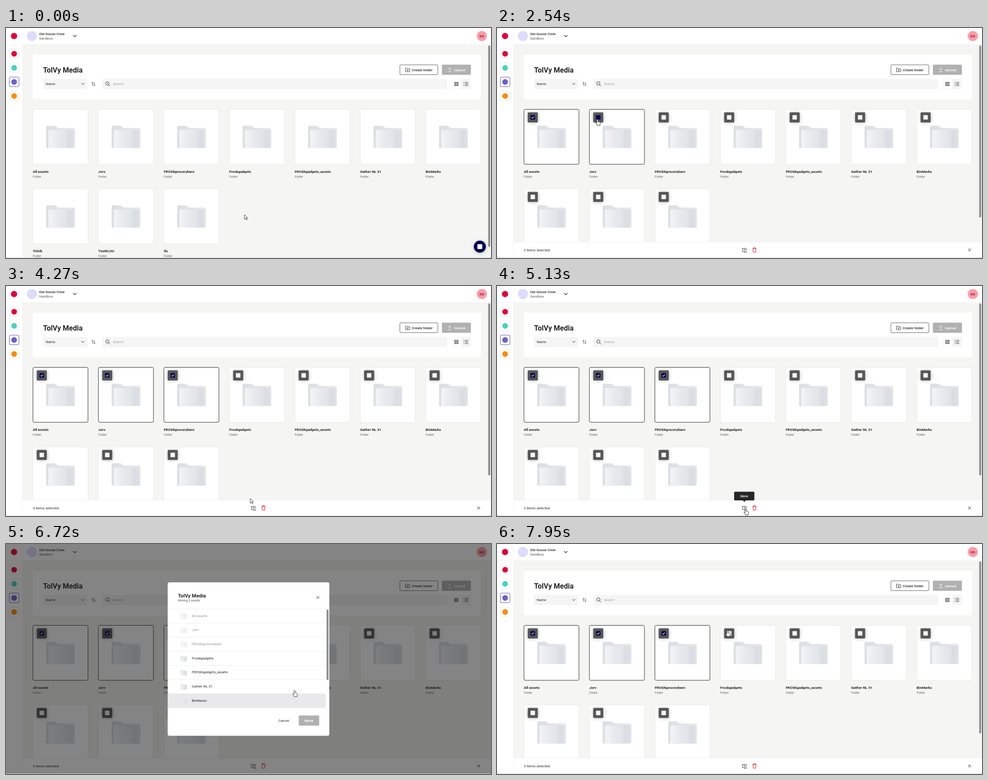
These frames come from a looping animation (1086 px wide and 516 px high, 8 s). An HTML page:

```html
<!DOCTYPE html>
<html lang="en">
<head>
<meta charset="utf-8">
<title>Media library</title>
<style>
html, body { margin: 0; width: 100%; height: 100%; overflow: hidden; background: #f5f5f4; }
svg { display: block; width: 1086px; height: 516px; font-family: Roboto, sans-serif; }
</style>
</head>
<body>
<svg id="stage" viewBox="0 0 1086 516" xmlns="http://www.w3.org/2000/svg"></svg>
<script>
const LOOP = 8000;
const INK = '#252525', NAVY = '#00004f', GREY = '#b1b1b1';
const NAMES = ['All assets', 'Jorv', 'FROSKgrocerybarn', 'Froskgadgets', 'FROSKgadgets_assets',
  'Gather NL 31', 'BinMarks', 'Tolvik', 'TestKLOU', 'Ila'];
const TITLE = 'TolVy Media';
const CLICKS = [1600, 2480, 3260];
const OPEN = 5450, LOADED = 5720, CLOSE = 7720;
const ROW = 31.7, LIST_TOP = 145.6, LIST_END = 367.5;

// pointer stops: time, x, y
const PATH = [
  [0, 534, 419], [180, 534, 419], [950, 28, 118], [1000, 28, 118], [1400, 79, 199],
  [1650, 79, 199], [2360, 225, 205], [2620, 225, 205], [3180, 372, 200], [3400, 372, 200],
  [4200, 547, 477], [4300, 547, 477], [4800, 557, 500], [6000, 557, 500], [6500, 630, 370],
  [6720, 646, 329], [6770, 648, 322], [6810, 649, 318], [7500, 702, 117], [7720, 702, 117],
  [7950, 516, 194], [8000, 516, 194]
];

const cardPos = i => ({ x: 60 + (i % 7) * 146.6, y: 182.3 + (i > 6 ? 178.4 : 0) });
const rowY = i => LIST_TOP + i * ROW;

const rect = (x, y, w, h, fill, r = 0, extra = '') =>
  `<rect x="${x}" y="${y}" width="${w}" height="${h}" rx="${r}" fill="${fill}" ${extra}/>`;
const circle = (x, y, r, fill, extra = '') => `<circle cx="${x}" cy="${y}" r="${r}" fill="${fill}" ${extra}/>`;
// y is the middle of the line
const text = (x, y, s, size = 8, weight = 400, fill = INK, extra = '') =>
  `<text x="${x}" y="${y + size * 0.355}" font-size="${size}" font-weight="${weight}" fill="${fill}" ${extra}>${s}</text>`;
const line = (d, stroke = INK, w = 1, extra = '') =>
  `<path d="${d}" fill="none" stroke="${stroke}" stroke-width="${w}" ${extra}/>`;
const group = (id, body, extra = '') => `<g id="${id}" ${extra}>${body}</g>`;
const MID = 'text-anchor="middle"';

const defs = `<defs>
  <linearGradient id="front"><stop offset="0" stop-color="#f3f4f6"/><stop offset=".3" stop-color="#e9ebee"/>
    <stop offset=".62" stop-color="#e2e5e9"/><stop offset=".8" stop-color="#d9dde1"/><stop offset="1" stop-color="#dfe2e6"/></linearGradient>
  <linearGradient id="back"><stop offset="0" stop-color="#dcdfe2"/><stop offset="1" stop-color="#e6e8eb"/></linearGradient>
  <filter id="soft" x="-60%" y="-60%" width="220%" height="220%"><feGaussianBlur stdDeviation="4"/></filter>
  <g id="folder">
    <path d="M30 40Q30 37 33 37H48Q51 37 53 39.5T58 42H91Q94 42 94 45V84Q94 87 91 87H33Q30 87 30 84Z" fill="url(#back)"/>
    <path d="M35 49Q35 46.500 37.500 46.500H92Q94 46.500 94 48.500V84Q94 87 91 87H38Q35 87 35 84Z" fill="url(#front)"/>
  </g></defs>`;

function header() {
  let s = rect(0, 0, 1086, 37, '#fff') + rect(0, 37, 37, 479, '#fff') +
    line('M0 37H1086M37 0V516', '#f0f0f0', 0.8) +
    circle(18, 18, 7, '#e4003a') + circle(58, 18, 11.3, '#dcdcfb') +
    text(74, 12.8, 'Old Goose Crew', 8, 500) + text(74, 23, 'Sandbox', 8, 400, '#555') +
    line('M150.300 16L154 19.700 157.700 16', INK, 1.2) +
    circle(1065.5, 18, 11.3, '#ff9ba8') + text(1065.5, 18.2, 'KD', 8, 500, '#6b1424', MID);
  ['#e4003a', '#45d3bb', '#6b60c9', '#ff8a00'].forEach((c, i) => {
    const y = 47 + i * 31.6;
    s += rect(7.5, y, 21.5, 21.5, '#fff', 2.5, `stroke="${i === 2 ? '#5450bd' : '#ececec'}"`) +
      circle(18.2, y + 10.8, 6.3, c);
  });
  return s;
}

function panel() {
  return rect(60, 60, 1003.5, 99.5, '#fff', 3) + text(83, 94, TITLE, 16, 700) +
    rect(882, 82.7, 85, 22, '#fff', 2, 'stroke="#5c5c5c"') +
    line('M894.500 97.500V90H898L899.500 91.500H904V98H894.500ZM899.300 92.800V96.600M897.400 94.700H901.200', INK, 0.9) +
    text(908.5, 94, 'Create folder', 8, 500) +
    rect(976, 82.3, 65, 22.8, GREY, 2) +
    line('M993.500 95.500V90M991 92.200L993.500 89.700 996 92.200M989.500 98H997.500', '#fff', 1) +
    text(1003, 94, 'Upload', 8, 500, '#fff') +
    rect(83, 114, 99, 23, '#f5f5f5', 2) + text(89, 125.3, 'Name') +
    line('M168.500 123.500L172 127 175.500 123.500') +
    line('M193.800 129.500V121.500M191.800 123.700L193.800 121.500 195.800 123.700M198 121.500V129.500M196 127.300L198 129.500 200 127.300', '#444', 0.9) +
    rect(216, 114, 772, 23, '#f5f5f5', 2) +
    `<circle cx="227" cy="124.500" r="3.700" fill="none" stroke="${INK}"/>` + line('M229.700 127.300L233 130.700') +
    text(239.5, 125.5, 'Search', 8, 400, '#a0a0a0', 'font-style="italic"') +
    rect(998, 114, 43, 23, '#f5f5f5', 2) + rect(999, 115, 20, 21, '#fff', 2) +
    line('M1004.500 121.500h3v3h-3zM1009.500 121.500h3v3h-3zM1004.500 126.500h3v3h-3zM1009.500 126.500h3v3h-3z') +
    line('M1024.500 122h1.500M1027.500 122h7.500M1024.500 125.500h1.500M1027.500 125.500h7.500M1024.500 129h1.500M1027.500 129h7.500', INK, 1.1);
}

const card = (name, i) => {
  const { x, y } = cardPos(i);
  return `<g transform="translate(${x} ${y})">` +
    rect(0.3, 0.2, 123.3, 123.3, '#fff', 3, `id="frame${i}" stroke="#e8e8e8"`) +
    '<use href="#folder"/>' +
    group('tile' + i, rect(9, 8, 23, 22, '#000', 2, 'opacity=".25" filter="url(#soft)"') +
      rect(8.8, 7, 22.6, 22.6, '#575757', 2) +
      rect(15.1, 13.2, 10, 10, '#f6f6f6', 1, `id="box${i}"`) +
      line('M17.400 18.300L19.300 20.300 22.900 16.300', '#fff', 1.2, `id="tick${i}"`)) +
    text(0, 139.7, name, 8, 700) + text(0, 150.8, 'Folder', 6.8, 400, '#666') + '</g>';
};

function bottomBar() {
  return rect(37.4, 480, 1049, 36, '#fff') + line('M37 480H1086', '#ededed', 0.8) +
    text(60, 498, '', 8, 400, INK, 'id="count"') +
    line('M549.500 493V501.500H553.500M549.500 495.500H553.500M553.500 494H555.500L556.300 495H558.800V497.500H553.500ZM553.500 500H555.500L556.300 501H558.800V503.500H553.500Z', '#444', 0.9) +
    line('M572.200 494.500H580.800M574.800 494.300V493H578.200V494.300M573.200 495L573.800 503H579.200L579.800 495', '#d5202c', 1.1) +
    line('M1055.200 495L1061.200 501M1061.200 495L1055.200 501', INK, 1);
}

function dialog() {
  let bones = '', rows = '';
  for (let i = 0; i < 5; i++) {
    const y = rowY(i);
    bones += rect(385, y + 2.6, 25.6, 26, '#e9e9eb', 4) + rect(416.3, y + 11.2, 104, 9, '#e9e9eb', 2) +
      line(`M362 ${y}H724`, '#ededed', 0.9);
  }
  for (let i = 0; i < 7; i++) {
    const y = rowY(i);
    rows += rect(362, y, 354, ROW, '#e9e9eb', 0, `id="row${i}"`) +
      `<g opacity="${i < 3 ? 0.5 : 1}"><use href="#folder" transform="translate(384.400 ${y + 0.8}) scale(.22 .25)"/>` +
      text(416, y + 15.2, NAMES[i], 8) + '</g>' + line(`M362 ${y}H724`, '#ededed', 0.9);
  }
  rows += line(`M362 ${LIST_END}H724`, '#ededed', 0.9);
  return rect(362, 86, 362, 344.3, '#fff', 4) +
    text(385, 116.3, TITLE, 11.3, 700) + text(385, 126.7, 'Moving 3 assets', 6.75, 400, '#555') +
    line('M695.500 117L701.500 123M701.500 117L695.500 123', INK, 1) +
    group('bones', bones) + group('rows', rows) +
    group('listBar', rect(716, 146.3, 8, 221, '#fff') + rect(717.8, 147, 4.4, 158, '#8f8f8f', 2)) +
    text(622, 395.7, 'Cancel', 8, 400, INK, MID) +
    rect(655.5, 384.8, 45.8, 22.6, NAVY, 2, 'id="move"') + text(678.4, 395.7, 'Move', 8, 700, '#fff', MID);
}

const stage = document.getElementById('stage');
stage.innerHTML = defs + rect(0, 0, 1086, 516, '#f5f5f4') + panel() +
  NAMES.map(card).join('') + header() +
  rect(1079.7, 39, 4.6, 452, '#8f8f8f', 2.3, 'id="pageBar"') +
  group('chat', circle(1061, 492, 14, '#000', 'opacity=".2" filter="url(#soft)"') +
    circle(1061, 490.5, 13.5, NAVY) + rect(1055.5, 485, 11, 11, '#fff', 2)) +
  group('bar', bottomBar()) +
  group('modal', rect(0, 0, 1086, 516, 'rgba(20,20,20,.52)') + dialog()) +
  group('tip', rect(531, 461.5, 45.3, 19.5, '#272727', 2) +
    '<path d="M550 480.500H557.500L553.700 484.500Z" fill="#272727"/>' + text(553.6, 471.3, 'Move', 7, 500, '#fff', MID)) +
  rect(0, 515, 1086, 1, '#d2d3d5') +
  group('pointer',
    '<path id="arrow" d="M0 0V10.200L2.400 8 4 11.600 5.800 10.900 4.200 7.300H7.300Z"/>' +
    '<path id="hand" d="M-1.300 1a1.300 1.300 0 0 1 2.600 0V5.200L5.200 6Q6.600 6.400 6.400 8L5.600 11.500V13.500H-1V12L-4 8.500Q-4.400 7-3 7L-1.300 8.400Z"/>',
    'fill="#fff" stroke="#222" stroke-width=".9" stroke-linejoin="round"');

const el = {};
stage.querySelectorAll('[id]').forEach(n => { el[n.id] = n; });
const show = (id, on) => el[id].setAttribute('visibility', on ? 'inherit' : 'hidden');
const set = (id, key, value) => el[id].setAttribute(key, value);
const ramp = (t, a, b) => Math.max(0, Math.min(1, (t - a) / (b - a)));

// slope at a stop; zero where the pointer rests
function slope(i, k) {
  const a = PATH[i - 1], b = PATH[i], c = PATH[i + 1];
  if (!a || !c || (a[1] === b[1] && a[2] === b[2]) || (b[1] === c[1] && b[2] === c[2])) return 0;
  return (c[k] - a[k]) / (c[0] - a[0]);
}

function pointerAt(t) {
  let i = 0;
  while (i < PATH.length - 2 && t >= PATH[i + 1][0]) i++;
  const a = PATH[i], b = PATH[i + 1], d = b[0] - a[0], u = ramp(t, a[0], b[0]);
  const at = k => a[k] * (1 + 2 * u) * (1 - u) ** 2 + slope(i, k) * d * u * (1 - u) ** 2 +
    b[k] * u * u * (3 - 2 * u) + slope(i + 1, k) * d * u * u * (u - 1);
  return { x: at(1), y: at(2) };
}

const inside = (p, x, y, w, h) => p.x >= x && p.x <= x + w && p.y >= y && p.y <= y + h;
const inList = p => inside(p, 362, LIST_TOP, 362, LIST_END - LIST_TOP);
const rowAt = p => inList(p) ? Math.floor((p.y - LIST_TOP) / ROW) : -1;

function render(t) {
  const p = pointerAt(t), late = pointerAt(Math.max(0, t - 60));
  const modal = t >= OPEN && t < CLOSE + 40, picking = t >= CLICKS[0], loaded = t >= LOADED;
  const hovered = modal ? -1 : NAMES.findIndex((_, i) => {
    const c = cardPos(i);
    return inside(p, c.x, c.y, 124, 124) && !(picking && p.y > 480);
  });

  NAMES.forEach((_, i) => {
    const on = i < CLICKS.length && t >= CLICKS[i];
    show('tile' + i, picking || i === hovered);
    show('tick' + i, on && t >= CLICKS[i] + 80);
    set('box' + i, 'fill', on ? NAVY : '#f6f6f6');
    set('frame' + i, 'stroke', on ? INK : '#e8e8e8');
  });

  const count = CLICKS.filter(c => t >= c).length;
  el.count.textContent = `${count} item${count === 1 ? '' : 's'} selected`;
  show('bar', picking);
  show('chat', !picking);
  show('pageBar', !modal);
  set('pageBar', 'height', picking ? 386 : 452);

  show('modal', modal);
  set('modal', 'opacity', ramp(t, OPEN - 10, OPEN + 40) * (1 - ramp(t, CLOSE, CLOSE + 40)));
  show('bones', !loaded);
  show('rows', loaded);
  const row = rowAt(late);
  for (let i = 0; i < 7; i++) show('row' + i, loaded && i === row && i > 2);
  show('listBar', loaded && inList(late));
  set('move', 'fill', t < 6000 ? NAVY : GREY);

  show('tip', t >= 4860 && t < LOADED);
  set('tip', 'opacity', ramp(t, 4840, 5100));

  const hand = modal
    ? loaded && (rowAt(p) > 2 || inside(p, 692, 113, 14, 14) || inside(p, 600, 385, 102, 23))
    : hovered >= 0 || inside(p, 7, 47, 22, 117) || (picking && inside(p, 546, 490, 38, 16));
  show('hand', hand);
  show('arrow', !hand);
  set('pointer', 'transform', `translate(${p.x.toFixed(2)} ${p.y.toFixed(2)})`);
}

const start = performance.now();
function tick() {
  render((performance.now() - start) % LOOP);
  requestAnimationFrame(tick);
}
tick();
</script>
</body>
</html>
```
